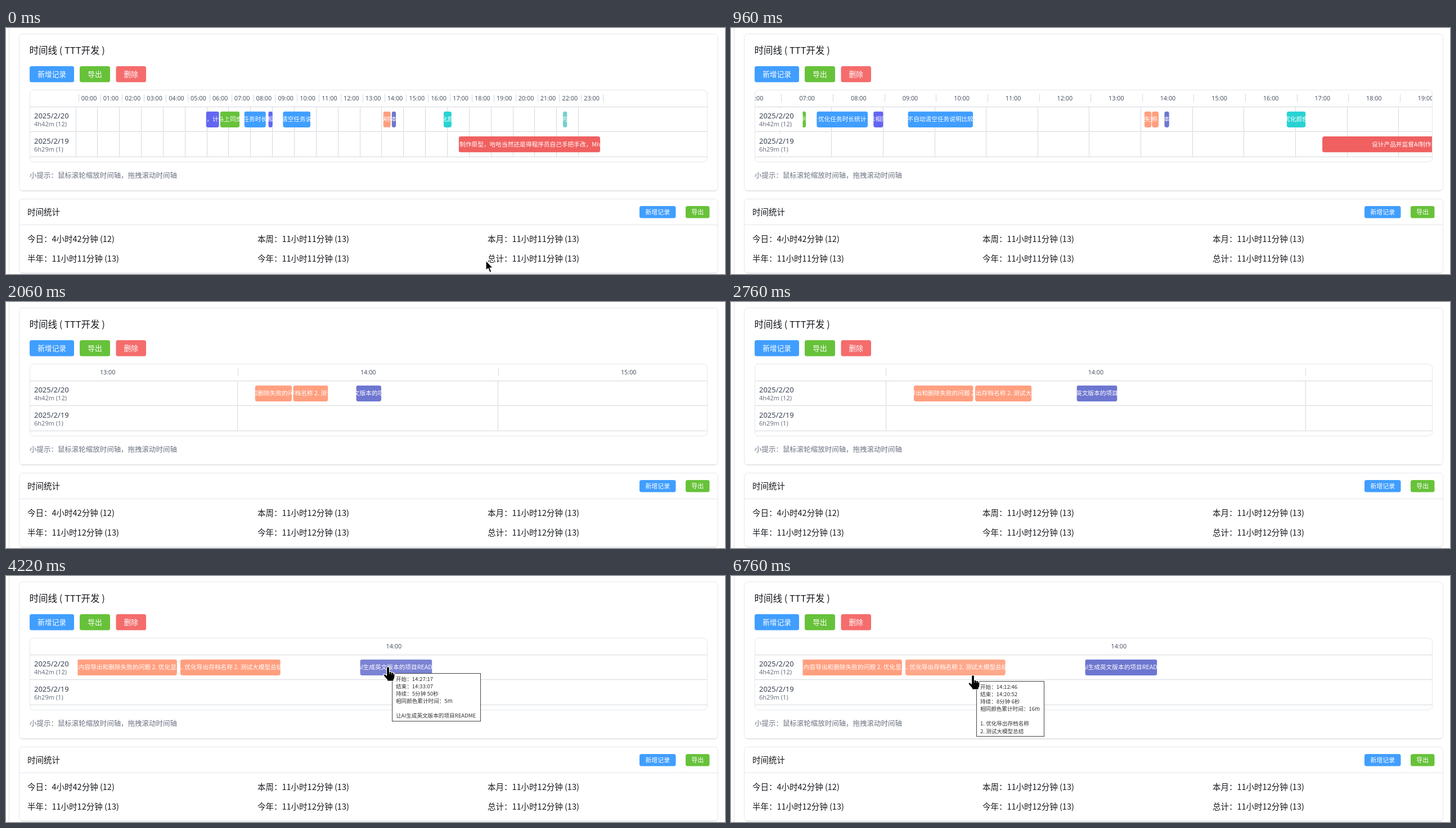
Write an HTML page that moves like this. It is 1278 px wide and 438 px high and loops after 8000 ms.

```html
<!DOCTYPE html>
<html lang="zh-CN">
<head>
<meta charset="utf-8">
<title>时间线</title>
<style>
html, body { margin: 0; width: 100%; height: 100%; overflow: hidden; background: #fff; }
#stage { display: block; width: 1278px; height: 438px; }
text { font-family: "Noto Sans CJK SC", "Noto Sans CJK", "Noto Sans CJK JP", sans-serif; fill: #16181c; white-space: pre; }
.num { font-family: "Noto Sans", "Open Sans", sans-serif; }
.mid { text-anchor: middle; }
.hour { font-size: 10.8px; fill: #4b5563; }
.date { font-size: 13px; fill: #374151; }
.sum { font-size: 11px; fill: #6b7280; }
.bar { font-size: 10.7px; fill: #fff; }
.tip { font-size: 9.6px; fill: #333; }
.hint { font-size: 12.48px; fill: #6b7280; }
.stat { font-size: 14.5px; }
.card { fill: #fff; stroke: #e4e7ed; }
.line { fill: #d5d8de; shape-rendering: crispEdges; }
.cursor { fill: #000; stroke: #fff; stroke-width: 1.2; stroke-linejoin: round; }
</style>
</head>
<body>
<svg id="stage" viewBox="0 0 1278 438">
  <defs>
    <clipPath id="view"><rect x="43" y="111" width="1203.5" height="127.5" rx="6"/></clipPath>
  </defs>
  <rect class="line" x="5" y="0" width="1" height="438" fill-opacity=".7"/>
  <g id="page"></g>
  <g id="chart" clip-path="url(#view)"></g>
  <rect x="42.5" y="110.5" width="1204" height="128" rx="6.500" fill="none" stroke="#e5e7eb"/>
  <g id="stats"></g>
  <g id="tip"></g>
  <g id="cursor"></g>
</svg>
<script>
const $ = id => document.getElementById(id);
const LOOP = 8000, HOUR = 38.85, LEFT = 43, RIGHT = 1247, LANE = 124;
const BLUE = '#409eff', GREEN = '#67c23a', RED = '#f56c6c', INDIGO = '#6366f1', ORANGE = '#ff9f7f';

const text = (x, y, cls, s, size) =>
  `<text x="${x}" y="${y}" class="${cls}"${size ? ` style="font-size:${size}px"` : ''}>${s}</text>`;
const line = (x, y, w, h) => `<rect class="line" x="${x}" y="${y}" width="${w}" height="${h}"/>`;
const button = (x, y, w, h, fill, label, size) =>
  `<rect x="${x}" y="${y}" width="${w}" height="${h}" rx="3.5" fill="${fill}"/>` +
  `<text x="${x + w / 2}" y="${y + h / 2 + size * .37}" class="mid" style="font-size:${size}px;fill:#fff">${label}</text>`;
const card = (y, h) =>
  `<rect x="24" y="${y + 1.5}" width="1241" height="${h}" rx="6" fill="#e3e5e8"/>` +
  `<rect class="card" x="23.5" y="${y}" width="1242" height="${h}" rx="6"/>`;

$('page').innerHTML =
  card(10.5, 279) + card(304.5, 131.5) +
  text(41.5, 46, '', '时间线 ( TTT开发 )', 16.5) +
  button(42, 68, 79, 28.5, BLUE, '新增记录', 12.7) +
  button(131, 68, 54, 28.5, GREEN, '导出', 12.7) +
  button(195.5, 68, 53.5, 28.5, RED, '删除', 12.7) +
  text(42, 267, 'hint', '小提示：鼠标滚轮缩放时间轴，拖拽滚动时间轴') +
  text(38, 332.5, 'stat', '时间统计') +
  `<rect x="24" y="350" width="1241" height="1" fill="#e4e7ed"/>` +
  button(1126, 317, 64.5, 21.5, BLUE, '新增记录', 10.9) +
  button(1208, 317, 42.5, 21.5, GREEN, '导出', 10.9);

// start hour, end hour, colour, label, row
const bars = [
  [5.957, 6.566, INDIGO, '优化界面，计时器修复'],
  [6.605, 7.505, GREEN, '修改后马上同步至列表'],
  [7.708, 8.704, BLUE, '优化任务时长统计'],
  [8.81, 9.004, INDIGO, '显示相同色'],
  [9.478, 10.745, BLUE, '新增记录后不自动清空任务说明比较好，万一用'],
  [14.0665, 14.2086, ORANGE, '1. 修复项目内容导出和删除失败的问题 2. 优化显示的效果'],
  [14.2128, 14.3478, ORANGE, '1. 优化导出存档名称 2. 测试大模型总结'],
  [14.4547, 14.5519, '#6d76d0', '让AI生成英文版本的项目README'],
  [16.83, 17.2, '#28d2d3', '调整配色，优化颜色算法和样式'],
  [22.29, 22.4, '#74cfd0', '时间可视化'],
  [17.52, 24, '#f06060', '设计产品并监督AI制作原型，哈哈当然还是得程序员自己手把手改，Mivora只能做参考用', 1]
];

// time, zoom level reached, fixed x of the zoom
const zooms = [
  [320, 1, 124], [400, 2, 124], [440, 3, 725],
  [480, 4, 864.6], [520, 5, 864.6], [600, 6, 864.6], [640, 7, 864.6], [720, 8, 864.6],
  [960, 9, 864.6], [1000, 10, 864.6],
  [1200, 11, 864.6], [1240, 12, 864.6], [1280, 13, 864.6], [1320, 14, 864.6],
  [1440, 16, 754.9], [1520, 18, 754.9], [1770, 20, 754.9], [1810, 24, 754.9], [2060, 26, 754.9],
  [2100, 28, 663], [2350, 29, 809], [2640, 30, 710],
  [2720, 31, 265.3], [2800, 32, 265.3], [2880, 33, 265.3],
  [3130, 35, 815], [3170, 36, 815], [3210, 37, 808]
];

function viewAt(t) {
  let level = 0, x = LANE + 14 * HOUR;
  for (const [at, next, pin] of zooms) {
    if (t < at) break;
    x = pin - (pin - x) * 1.1 ** (next - level);
    level = next;
  }
  const w = HOUR * 1.1 ** level;
  return { w, zero: x - 14 * w };
}

function bar([from, to, fill, label, row = 0], { w, zero }, hot) {
  const x = zero + from * w, width = Math.max(7.6, (to - from) * w - .3);
  if (x > RIGHT || x + width < LEFT) return '';
  return `<svg x="${x.toFixed(2)}" y="${row ? 193 : 148.5}" width="${width.toFixed(2)}" height="28.5" opacity="${hot ? .9 : 1}">` +
    `<rect width="100%" height="100%" rx="4" fill="${fill}"/>` +
    `<text x="50%" y="17.7" class="bar mid">${label}</text></svg>`;
}

function drawChart(view, hot) {
  const { w, zero } = view, scroll = LANE - zero;
  const end = LEFT - scroll + Math.max(RIGHT - LEFT, 24 * w);
  const shift = Math.min(5.2, 240 / w);
  let s = line(LEFT, 140, 1204, 1);
  for (const y of [184, 229]) s += line(LEFT, y, Math.min(1204, end - LEFT), 1);
  for (let h = 0; h <= 24; h++) {
    const x = zero + h * w;
    if (x > RIGHT || x + w < LEFT) continue;
    s += line(Math.floor(x + shift), 118, 1, 14);
    if (h === 24) continue;
    s += text((x + w / 2 + shift * .8).toFixed(2), 129, 'num hour mid', String(h).padStart(2, '0') + ':00');
    s += line(Math.floor(x), 141, 1, 43) + line(Math.floor(x), 186, 1, 43);
  }
  bars.forEach((b, i) => s += bar(b, view, i === hot));
  const cover = LANE - LEFT + Math.min(3.5, Math.max(0, scroll));
  for (const y of [143, 188]) s += `<rect x="${LEFT}" y="${y}" width="${cover}" height="39" fill="#fff"/>`;
  s += text(50, 161, 'num date', '2025/2/20') + text(50, 175, 'num sum', '4h42m (12)') +
    text(50, 205.5, 'num date', '2025/2/19') + text(50, 220, 'num sum', '6h29m (1)');
  return s;
}

function drawStats(min) {
  const total = `11小时${min}分钟 (13)`;
  return ['今日', '本周', '本月', '半年', '今年', '总计'].map((name, i) =>
    text(38 + 409 * (i % 3), i < 3 ? 380.5 : 416, 'stat', `${name}：${i ? total : '4小时42分钟 (12)'}`)).join('');
}

const tips = [
  [4220, 5580, 687, 173, 157, 86, ['开始：14:27:17', '结束：14:33:07', '持续：5分钟 50秒', '相同颜色累计时间：5m', '', '让AI生成英文版本的项目README']],
  [6760, LOOP, 437, 187, 120, 99, ['开始：14:12:46', '结束：14:20:52', '持续：8分钟 6秒', '相同颜色累计时间：16m', '', '1. 优化导出存档名称', '2. 测试大模型总结']]
];
const drawTip = ([, , x, y, w, h, rows]) =>
  `<rect x="${x - .5}" y="${y + .5}" width="${w}" height="${h - 1}" fill="#fff" stroke="#444"/>` +
  rows.map((r, i) => text(x + 6, y + 13.6 + i * 13.15, 'tip', r)).join('');

const shapes = {
  arrow: '<path d="M0 0V17.5L4 14l3 7.200 3-1.300-3-6.900h5.500z"/>',
  hand: '<path d="M-2.500 2a2.500 2.500 0 0 1 5 0V8.500q3-.8 3.600 1 3-.6 3.400 1.200 2.500 0 2.500 2.600V17q0 3-2 5.500V25H-1.500V23Q-5 19-7.600 15.500q-1.200-2.600 1-2.800 2 0 4.100 2.300z"/>' +
    '<path d="M2.500 8.500v4.500M6.100 9.500v4M9.500 10.700v3.300" stroke-width=".7" fill="none"/>'
};
// from, to, start x, y, end x, y, shape
const moves = [
  [0, 240, 853, 414, 640, 190, 'arrow'],
  [240, 320, 640, 190, 597, 166, 'arrow'],
  [320, 480, 597, 166, 597, 166, 'hand'],
  [480, 720, 597, 166, 735, 163, 'hand'],
  [3410, 3490, 687, 153, 687, 153, 'hand'],
  [3650, 3730, 679, 155, 679, 162, 'hand'],
  [3730, 5580, 679, 162, 679, 162, 'hand'],
  [5580, 5700, 665, 163, 625, 172, 'arrow'],
  [6190, 6230, 429, 175, 429, 175, 'hand'],
  [6230, LOOP, 430, 177, 430, 177, 'hand']
];

function drawCursor(t) {
  const m = moves.find(([a, b]) => t >= a && t < b);
  if (!m) return '';
  const [a, b, x0, y0, x1, y1, shape] = m;
  const k = Math.floor((t - a) / 40) * 40 / (b - a);
  const at = (p, q) => (p + (q - p) * k).toFixed(1);
  return `<g class="cursor" transform="translate(${at(x0, x1)} ${at(y0, y1)})">${shapes[shape]}</g>`;
}

const hotAt = t => t >= 3650 && t < 5580 ? 7 : t >= 6190 ? 6 : -1;

const last = {};
function put(id, key, draw) {
  if (last[id] === key) return;
  last[id] = key;
  $(id).innerHTML = draw();
}

function frame() {
  const t = performance.now() % LOOP;
  const view = viewAt(t), hot = hotAt(t);
  put('chart', view.w + '/' + hot, () => drawChart(view, hot));
  const min = t < 2060 ? 11 : 12;
  put('stats', min, () => drawStats(min));
  const tip = tips.find(([a, b]) => t >= a && t < b);
  put('tip', tip, () => tip ? drawTip(tip) : '');
  const cursor = drawCursor(t);
  put('cursor', cursor, () => cursor);
  requestAnimationFrame(frame);
}
frame();
</script>
</body>
</html>
```
